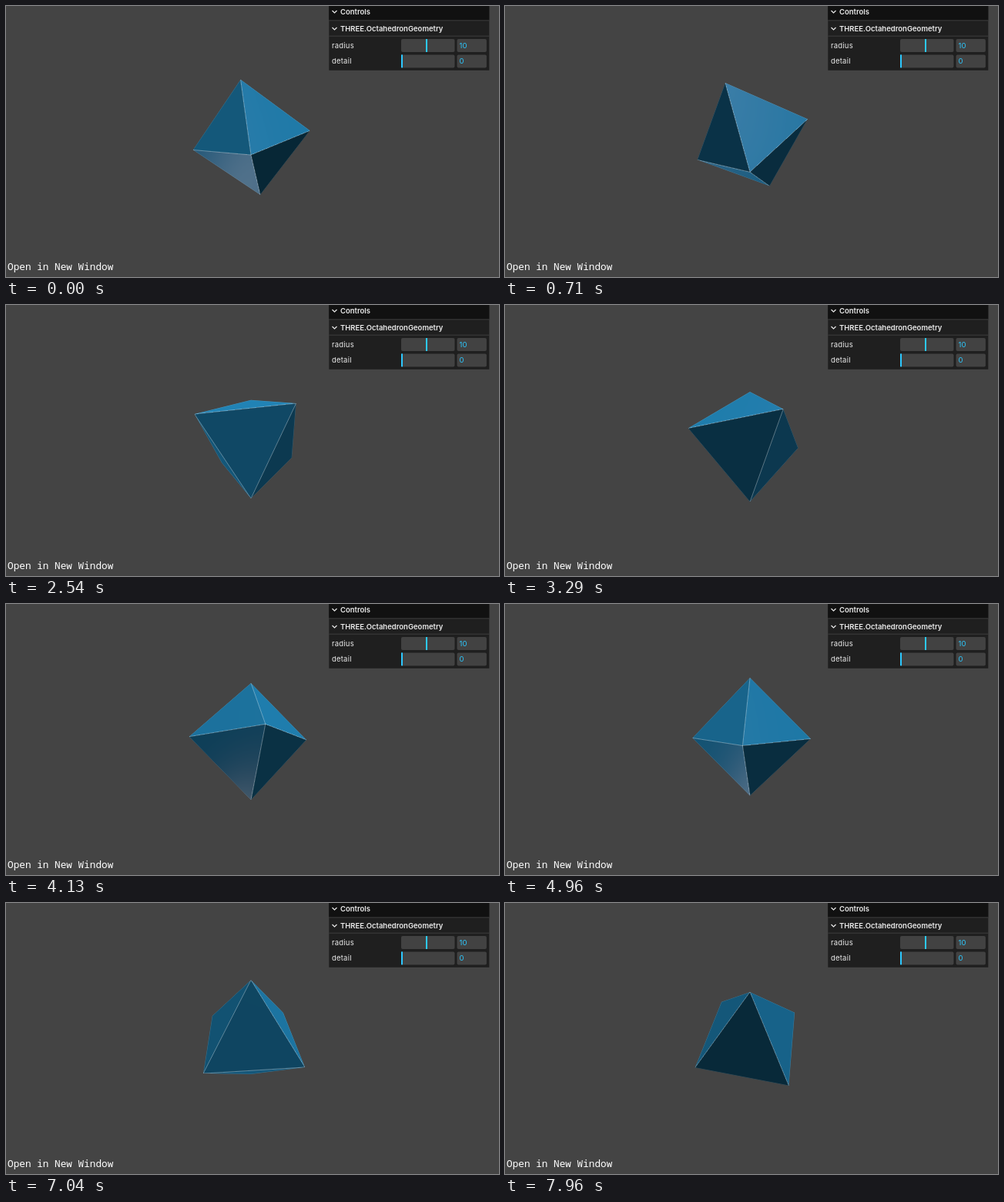
Animation of 640x353 px, one loop 8000 ms. Source, as an HTML page with a canvas:

```html
<!DOCTYPE html>
<html lang="en">
<head>
<meta charset="utf-8">
<title>Octahedron</title>
<style>
  html, body { margin: 0; width: 100%; height: 100%; overflow: hidden; background: #444; }
  canvas, svg { position: absolute; left: 0; top: 0; width: 640px; height: 353px; }
  text { font: 9.5px Inter, sans-serif; letter-spacing: .2px; fill: #ebebeb; }
  .title { font-weight: 600; letter-spacing: 0; }
  .value, .knob { fill: #2cc9ff; }
  .widget { fill: #424242; }
  .link { font: 12.73px "Noto Sans Mono", monospace; letter-spacing: 0; fill: #fff; }
  .chevron { fill: none; stroke: #ebebeb; stroke-width: 1.2; }
</style>
</head>
<body>
<canvas id="stage" width="640" height="353"></canvas>
<svg viewBox="0 0 640 353">
  <rect x="419.3" width="208" height="83.8" fill="#1f1f1f"/>
  <rect x="419.3" width="208" height="18.4" fill="#111"/>
  <path d="M419.3 18.85h208M419.3 39.2h208" stroke="#424242" stroke-width=".85"/>
  <path class="chevron" d="M423.5 6l3 3 3-3M423.5 28l3 3 3-3"/>
  <text class="title" x="434" y="11">Controls</text>
  <text class="title" x="434" y="33.3">THREE.OctahedronGeometry</text>
  <text x="423" y="55.2">radius</text>
  <text x="423" y="75.4">detail</text>
  <g class="widget">
    <rect x="513" y="43" width="69.5" height="17" rx="2"/>
    <rect x="585.5" y="43" width="38.4" height="17" rx="2"/>
    <rect x="513" y="63.4" width="69.5" height="17" rx="2"/>
    <rect x="585.5" y="63.4" width="38.4" height="17" rx="2"/>
  </g>
  <rect class="knob" x="545" y="43" width="2" height="17"/>
  <rect class="knob" x="513" y="63.4" width="2" height="17"/>
  <text class="value" x="588.4" y="55.2">10</text>
  <text class="value" x="588.4" y="75.4">0</text>
  <text class="link" x="2" y="344">Open in New Window</text>
</svg>
<script>
const LOOP = 8000, START = -1.405, SPEED = 0.3;   // radians, radians per second
const CENTER_X = 318, CENTER_Y = 175, FOCAL = 231, CAMERA = 30, RADIUS = 10;
const BOX = { x: 230, y: 85, w: 178, h: 180 };

const ctx = document.getElementById('stage').getContext('2d');
const buffer = document.createElement('canvas');
buffer.width = BOX.w;
buffer.height = BOX.h;
const bufferCtx = buffer.getContext('2d');
const pixels = bufferCtx.createImageData(BOX.w, BOX.h);

const dot = (a, b) => a[0] * b[0] + a[1] * b[1] + a[2] * b[2];
const scale = (v, k) => v.map(c => c * k);
const unit = v => scale(v, 1 / Math.hypot(...v));
const toLinear = c => ((c / 255 + 0.055) / 1.055) ** 2.4;
const toScreen = c => 255 * (1.055 * c ** (1 / 2.4) - 0.055);

const diffuse = [21, 98, 137].map(toLinear);
const emissive = [7, 37, 52].map(toLinear);
const SPECULAR = toLinear(17), SHININESS = 30, INTENSITY = 3;
const lights = [[0, 1, 0], [1, 2, 1], [-1, -2, -1]].map(unit);

function rotate([x, y, z], a, b) {
  const x1 = x * Math.cos(b) + z * Math.sin(b);
  const z1 = z * Math.cos(b) - x * Math.sin(b);
  return [x1, y * Math.cos(a) - z1 * Math.sin(a), y * Math.sin(a) + z1 * Math.cos(a)];
}

function project([x, y, z]) {
  const k = FOCAL / (CAMERA - z);
  return [CENTER_X + x * k, CENTER_Y - y * k];
}

function visibleFaces(angle) {
  const axes = [[RADIUS, 0, 0], [0, RADIUS, 0], [0, 0, RADIUS]].map(v => rotate(v, angle, -angle));
  const faces = [];
  for (let i = 0; i < 8; i++) {
    const corners = axes.map((v, k) => scale(v, i >> k & 1 ? 1 : -1));
    const normal = unit([0, 1, 2].map(c => corners[0][c] + corners[1][c] + corners[2][c]));
    const offset = RADIUS / Math.sqrt(3) - CAMERA * normal[2];
    if (offset >= 0) continue;
    const lit = lights.map(l => Math.max(0, dot(normal, l)) * INTENSITY);
    const total = (lit[0] + lit[1] + lit[2]) / Math.PI;
    const color = diffuse.map((c, k) => c * total + emissive[k]);
    faces.push({ corners, normal, offset, lit, color });
  }
  return faces;
}

// Blinn-Phong highlight with Schlick's Fresnel term
function highlight(face, vx, vy, vz) {
  let sum = 0;
  for (let i = 0; i < 3; i++) {
    if (!face.lit[i]) continue;
    const l = lights[i], n = face.normal;
    const hx = l[0] + vx, hy = l[1] + vy, hz = l[2] + vz;
    const size = Math.hypot(hx, hy, hz);
    const nh = Math.max(0, (n[0] * hx + n[1] * hy + n[2] * hz) / size);
    const vh = Math.max(0, (vx * hx + vy * hy + vz * hz) / size);
    const fresnel = 2 ** ((-5.55473 * vh - 6.98316) * vh);
    const reflect = SPECULAR * (1 - fresnel) + fresnel;
    sum += face.lit[i] * reflect * 0.25 * (SHININESS / 2 + 1) / Math.PI * nh ** SHININESS;
  }
  return sum;
}

function shade(faces) {
  let p = 0;
  for (let y = 0; y < BOX.h; y++) {
    for (let x = 0; x < BOX.w; x++, p += 4) {
      const dx = (BOX.x + x + 0.5 - CENTER_X) / FOCAL;
      const dy = (CENTER_Y - BOX.y - y - 0.5) / FOCAL;
      let hit = faces[0], depth = -Infinity;
      for (const face of faces) {
        const n = face.normal, slope = n[0] * dx + n[1] * dy - n[2];
        const t = slope < 0 ? face.offset / slope : Infinity;
        if (t > depth) { depth = t; hit = face; }
      }
      const k = 1 / Math.hypot(dx, dy, 1);
      const shine = highlight(hit, -dx * k, -dy * k, k);
      for (let c = 0; c < 3; c++) pixels.data[p + c] = toScreen(hit.color[c] + shine);
      pixels.data[p + 3] = 255;
    }
  }
  bufferCtx.putImageData(pixels, 0, 0);
}

function draw(now) {
  const time = now % LOOP / 1000;
  const faces = visibleFaces(START + SPEED * time);
  shade(faces);

  const outline = new Path2D();
  for (const { corners } of faces) {
    corners.forEach((v, i) => outline[i ? 'lineTo' : 'moveTo'](...project(v)));
    outline.closePath();
  }
  ctx.fillStyle = '#444';
  ctx.fillRect(0, 0, 640, 353);
  ctx.save();
  ctx.clip(outline);
  ctx.drawImage(buffer, BOX.x, BOX.y);
  ctx.lineJoin = 'round';
  ctx.lineWidth = 0.5;
  ctx.strokeStyle = 'rgba(255,255,255,.35)';
  ctx.stroke(outline);
  ctx.restore();
  requestAnimationFrame(draw);
}
requestAnimationFrame(draw);
</script>
</body>
</html>
```
